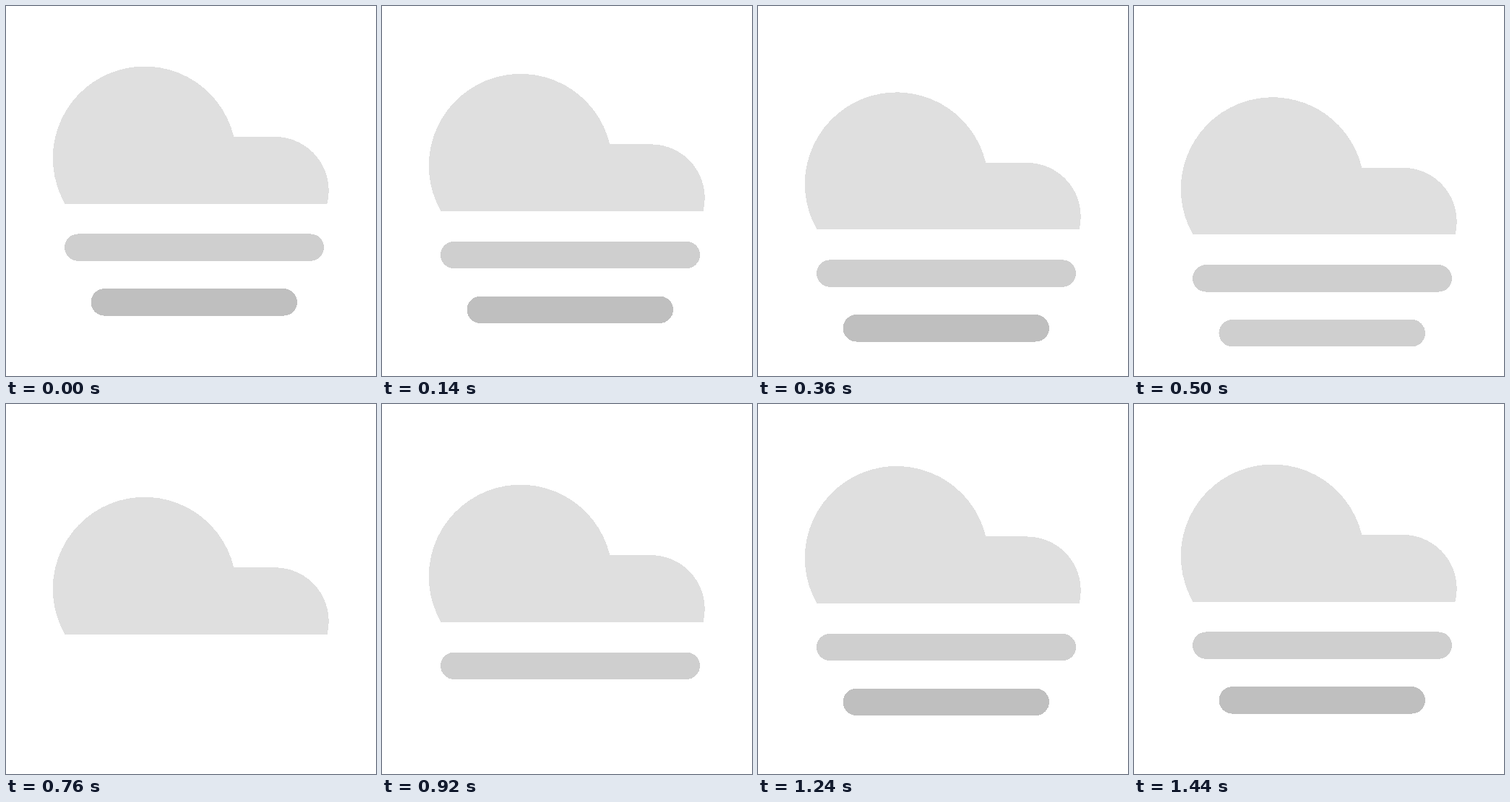
Animation, 512 px wide and 512 px high, one loop 1.58 s. Source, as an HTML page:

```html
<!DOCTYPE html>
<html lang="en">
<head>
<meta charset="utf-8">
<title>Fog</title>
<style>
  html, body { margin: 0; width: 100%; height: 100%; overflow: hidden; background: #fff; }
  svg { display: block; width: 100%; height: 100%; shape-rendering: crispEdges; }
</style>
</head>
<body>
<svg viewBox="0 0 512 512">
  <g id="fog">
    <path fill="#dfdfdf" d="M81.5 273.5A127 127 0 1 1 315.3 181H371A74.5 74.5 0 0 1 444.5 273.5Z"/>
    <rect id="upper" x="81" y="315.4" width="359" height="37.4" rx="18.7" fill="#cfcfcf"/>
    <rect id="lower" x="117.5" y="391.2" width="285.5" height="37.4" rx="18.7"/>
  </g>
</svg>
<script>
  const LOOP = 1580, TURN = 735, END = 1440, STEP = 20, DROP = 46;
  const fog = document.getElementById('fog');
  const upper = document.getElementById('upper');
  const lower = document.getElementById('lower');

  const bezier = (a, b, s) => 3 * a * s * (1 - s) ** 2 + 3 * b * s * s * (1 - s) + s ** 3;

  // Cubic easing, solved by bisection
  function ease(x) {
    if (x <= 0) return 0;
    if (x >= 1) return 1;
    let lo = 0, hi = 1;
    for (let i = 0; i < 24; i++) {
      const mid = (lo + hi) / 2;
      if (bezier(0.3, 0.25, mid) < x) lo = mid; else hi = mid;
    }
    return bezier(0.1, 1, lo);
  }

  const show = (bar, visible) => bar.setAttribute('visibility', visible ? 'visible' : 'hidden');

  function draw(t) {
    const y = DROP * (t < TURN ? ease(t / TURN) : 1 - ease((t - TURN) / (END - TURN)));
    fog.setAttribute('transform', `translate(0 ${y.toFixed(2)})`);
    show(upper, t < 640 || t >= 860);
    show(lower, t < 560 || t >= 940);
    lower.setAttribute('fill', t >= 460 && t < 1000 ? '#cfcfcf' : '#bfbfbf');
  }

  const start = performance.now();
  function tick() {
    const t = (performance.now() - start) % LOOP;
    draw(Math.floor(t / STEP) * STEP);
    requestAnimationFrame(tick);
  }
  tick();
</script>
</body>
</html>
```
